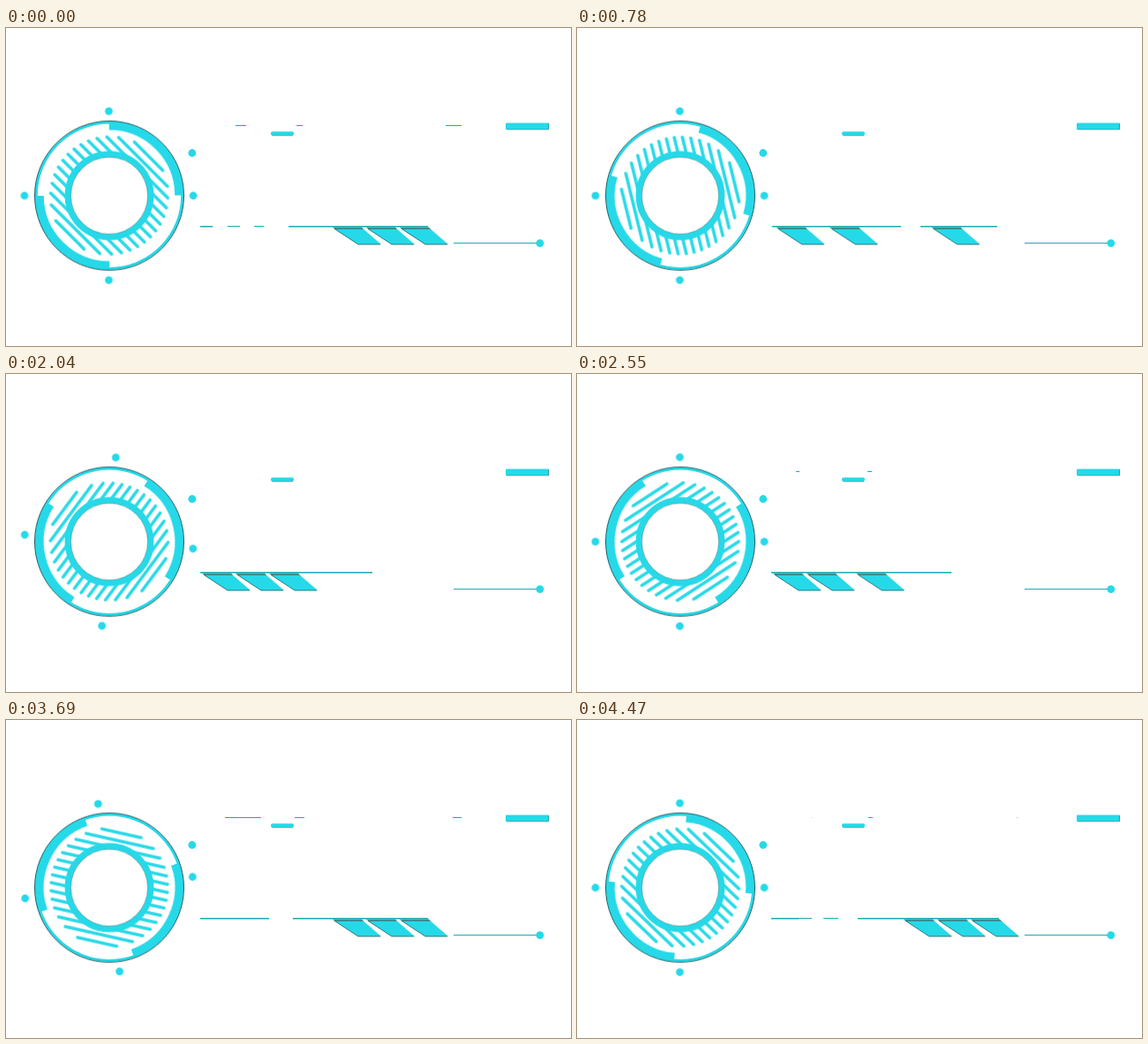
Write an HTML page that moves like this. It is 640 px wide and 360 px high and loops after 4.5 s.

```html
<!DOCTYPE html>
<html lang="en">
<head>
<meta charset="utf-8">
<title>HUD panel</title>
<style>
html, body { margin: 0; width: 100%; height: 100%; overflow: hidden; background: #fff; }
svg { display: block; width: 640px; height: 360px; }
.fill { fill: #26d9e8; }
.ink { fill: none; stroke: #26d9e8; }
.edge { fill: none; stroke: #0c4a50; }
.thin { fill: #19aab4; }
.anim { animation: 4500ms linear infinite; }

#hatch { animation-name: hatch; }
@keyframes hatch { from { transform: rotate(45deg); } to { transform: rotate(225deg); } }

/* arcs swing back and forth, one and a half turns each way */
#arcs { animation-name: arcs; }
@keyframes arcs {
  0% { transform: rotate(540deg); animation-timing-function: cubic-bezier(.333,.129,.667,.697); }
  17.333% { transform: rotate(196.5deg); animation-timing-function: cubic-bezier(.333,.688,.667,.845); }
  33.333% { transform: rotate(57deg); animation-timing-function: cubic-bezier(.333,.602,.667,1); }
  44.49% { transform: rotate(32deg); animation-timing-function: cubic-bezier(.333,0,.667,.3); }
  56.667% { transform: rotate(58deg); animation-timing-function: cubic-bezier(.333,.16,.667,.361); }
  72% { transform: rotate(202deg); animation-timing-function: cubic-bezier(.333,.263,.667,.671); }
  82% { transform: rotate(430deg); animation-timing-function: cubic-bezier(.333,.694,.667,1); }
  94.49% { transform: rotate(565deg); animation-timing-function: cubic-bezier(.333,0,.667,.382); }
  99.333% { transform: rotate(545deg); }
  100% { transform: rotate(540deg); }
}

#dots { animation-name: dots; animation-timing-function: cubic-bezier(.37,0,.63,1); }
@keyframes dots {
  0%, 4.98% { transform: rotate(0deg); }
  15.64% { transform: rotate(-90deg); }
  32.31% { transform: rotate(-90deg); animation-timing-function: cubic-bezier(.33,.22,.67,.78); }
  44.49% { transform: rotate(-180deg); animation-timing-function: cubic-bezier(.33,.22,.67,.78); }
  56.667%, 73.33% { transform: rotate(-90deg); }
  84%, 100% { transform: rotate(0deg); }
}

.bar { animation-timing-function: cubic-bezier(.37,0,.63,1); }
#b1 { animation-name: b1; }
#b2 { animation-name: b2; }
#b3 { animation-name: b3; }
@keyframes b1 {
  0%, 3.4% { transform: translateX(370px); }
  18.96%, 60% { transform: translateX(222px); }
  75.56%, 100% { transform: translateX(370px); }
}
@keyframes b2 {
  0%, 6.13% { transform: translateX(408px); }
  21.69%, 56.8% { transform: translateX(260px); }
  72.2%, 100% { transform: translateX(408px); }
}
@keyframes b3 {
  0%, 11.6% { transform: translateX(446px); }
  27.16%, 53.1% { transform: translateX(298px); }
  68.67%, 100% { transform: translateX(446px); }
}

#l1 { animation-name: l1; }
#l2 { animation-name: l2; }
#l3 { animation-name: l3; }
#l4 { animation-name: l4; }
@keyframes l1 {
  0%, 100% { x: 220px; width: 14px; }
  17.333% { x: 221px; width: 146px; }
  33.333% { x: 220px; width: 185px; }
  56.667% { x: 220px; width: 204px; }
  72% { x: 220px; width: 15px; }
  82% { x: 220px; width: 78px; }
  99.333% { x: 220px; width: 32px; }
}
@keyframes l2 {
  0%, 100% { x: 320px; width: 158px; }
  17.333% { x: 389px; width: 87px; }
  33.333% { x: 404px; width: 1px; }
  56.667% { x: 423px; width: 1px; }
  72% { x: 320px; width: 158px; }
  82% { x: 325px; width: 153px; }
  99.333% { x: 318px; width: 160px; }
}
@keyframes l3 {
  0%, 100% { x: 251px; width: 14px; }
  8%, 92% { x: 251px; width: 0; }
  99.333% { x: 251px; width: 15px; }
}
@keyframes l4 {
  0%, 100% { x: 281px; width: 11px; }
  8%, 68% { x: 292px; width: 0; }
  72% { x: 310px; width: 3px; }
  76%, 90% { x: 300px; width: 0; }
  99.333% { x: 279px; width: 17px; }
}

#t1 { animation-name: t1; }
#t2 { animation-name: t2; }
#t3 { animation-name: t3; }
@keyframes t1 {
  0%, 100% { x: 260px; width: 12px; }
  6% { x: 272px; width: 0; }
  53% { x: 248px; width: 0; }
  56.667% { x: 248px; width: 4px; }
  72% { x: 256px; width: 28px; }
  82% { x: 248px; width: 41px; }
  99.333% { x: 266px; width: 0; }
}
@keyframes t2 {
  0%, 100% { x: 329px; width: 7px; }
  10%, 54% { x: 332px; width: 0; }
  56.667% { x: 329px; width: 5px; }
  72% { x: 328px; width: 8px; }
  82% { x: 327px; width: 11px; }
  99.333% { x: 330px; width: 5px; }
}
@keyframes t3 {
  0%, 100% { x: 498px; width: 18px; }
  12% { x: 515px; width: 0; }
  65% { x: 501px; width: 0; }
  72% { x: 501px; width: 9px; }
  82% { x: 506px; width: 10px; }
  99.333% { x: 498px; width: 0; }
}
</style>
</head>
<body>
<svg viewBox="0 0 640 360">
  <defs>
    <g id="slat">
      <path class="fill" d="M0 226H33L55 245H29Z"/>
      <path fill="#3d8b91" d="M0 225.5H33L35 228H3.5Z"/>
      <path class="edge" stroke-width=".7" d="M2 227.3L29 245H54"/>
    </g>
  </defs>

  <g transform="translate(117 189.7)">
    <circle class="ink" r="82.7" stroke-width="3"/>
    <g id="arcs" class="anim">
      <path id="arc" class="ink" stroke-width="9.5" d="M0-79A79 79 0 0 1 79 0"/>
      <use href="#arc" transform="rotate(180)"/>
    </g>
    <circle class="edge" r="84.5" stroke-width=".9"/>
    <g id="hatch" class="anim ink" stroke-width="3.7" stroke-linecap="round"></g>
    <circle r="47" fill="#fff"/>
    <circle class="ink" r="47" stroke-width="6.8"/>
    <circle class="edge" r="43.5" stroke-width=".6" opacity=".6"/>
    <g transform="translate(-.5 .1)">
      <g id="dots" class="anim fill">
        <circle cx="95.6" r="4.4"/>
        <circle cx="-95.6" r="4.4"/>
        <circle cy="95.6" r="4.4"/>
        <circle cy="-95.6" r="4.4"/>
      </g>
    </g>
  </g>

  <g class="fill">
    <circle cx="210.8" cy="141.5" r="4.4"/>
    <rect x="566" y="107.5" width="49" height="7.5" rx="1"/>
    <rect x="300" y="117.3" width="26" height="4.4" rx="1.8"/>
    <circle cx="604.8" cy="243.6" r="4.4"/>
  </g>
  <path class="edge" stroke-width=".6" opacity=".6" d="M567 115H614.5V108M301.5 121.8H325"/>
  <rect class="thin" x="507" y="243" width="94" height="1"/>

  <g class="thin">
    <rect id="t1" class="anim" y="110" height="1"/>
    <rect id="t2" class="anim" y="110" height="1"/>
    <rect id="t3" class="anim" y="110" height="1"/>
  </g>

  <g id="b1" class="anim bar"><use href="#slat"/></g>
  <g id="b2" class="anim bar"><use href="#slat"/></g>
  <g id="b3" class="anim bar"><use href="#slat"/></g>

  <g class="thin">
    <rect id="l1" class="anim" y="224" height="1.5"/>
    <rect id="l2" class="anim" y="224" height="1.5"/>
    <rect id="l3" class="anim" y="224" height="1"/>
    <rect id="l4" class="anim" y="224" height="1"/>
  </g>
</svg>
<script>
// parallel strokes trimmed to a circle
let d = '';
for (let k = -7; k <= 7; k++) {
  const y = k * 9;
  const half = Math.sqrt(67.5 ** 2 - y * y) - 1.5;
  d += `M${-half} ${y}H${half}`;
}
const path = document.createElementNS('http://www.w3.org/2000/svg', 'path');
path.setAttribute('d', d);
document.getElementById('hatch').append(path);
</script>
</body>
</html>
```
